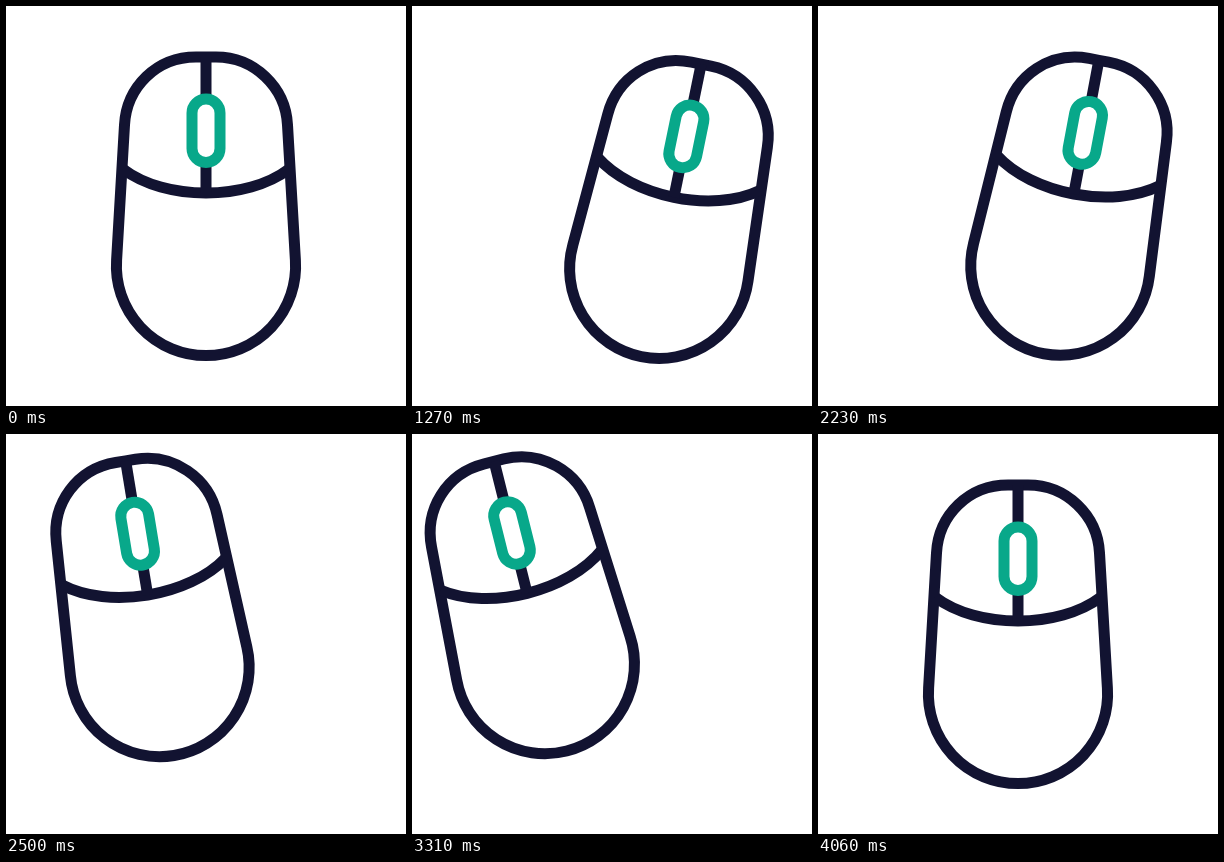
An HTML page with a canvas for the animation above (4.09 s loop, 400 px wide and 400 px high).

```html
<!DOCTYPE html>
<html lang="en">
<head>
<meta charset="utf-8">
<title>Computer mouse</title>
<style>
  html, body { margin: 0; width: 100%; height: 100%; overflow: hidden; background: #fff; }
  canvas { display: block; width: 100vw; height: 100vh; }
</style>
</head>
<body>
<canvas id="stage"></canvas>
<script>
const LOOP = 4090;
const NAVY = '#121331';
const GREEN = '#08a88a';
const canvas = document.getElementById('stage');
const ctx = canvas.getContext('2d');

const CENTER = { x: 0, y: 0, turn: 0 };
const RIGHT = { x: 67, y: 6.1, turn: 13.1 };
const LEFT = { x: -88.3, y: -28.5, turn: -15.2 };

// ease holds the x values of the two bezier handles; bend lifts the path
const moves = [
  { start: 1000, end: 1510, from: CENTER, to: RIGHT, ease: [0.28, 0.03], bend: 13 },
  { start: 2140, end: 2740, from: RIGHT, to: LEFT, ease: [0.3, 0.44], bend: 29 },
  { start: 3220, end: 3760, from: LEFT, to: CENTER, ease: [0.37, 0.5], bend: 25 }
];
const clicks = [[1570, 2050], [2740, 3070], [3760, 4060]];

const clamp = v => Math.min(1, Math.max(0, v));
const smooth = s => s * s * (3 - 2 * s);
const mix = (a, b, u) => a + (b - a) * u;

function bezierEase(p, [x1, x2]) {
  let lo = 0, hi = 1;
  for (let i = 0; i < 24; i++) {
    const s = (lo + hi) / 2, r = 1 - s;
    const x = 3 * s * r * r * x1 + 3 * s * s * r * x2 + s * s * s;
    if (x < p) lo = s; else hi = s;
  }
  return smooth((lo + hi) / 2);
}

function poseAt(t) {
  let pose = CENTER;
  for (const m of moves) {
    if (t < m.start) break;
    if (t >= m.end) { pose = m.to; continue; }
    const u = bezierEase((t - m.start) / (m.end - m.start), m.ease);
    pose = {
      x: mix(m.from.x, m.to.x, u),
      y: mix(m.from.y, m.to.y, u) - m.bend * u * (1 - u),
      turn: mix(m.from.turn, m.to.turn, u)
    };
  }
  return pose;
}

function pressAt(t) {
  for (const [a, b] of clicks) {
    if (t > a && t < b) {
      const p = (t - a) / (b - a);
      return smooth(clamp(Math.min(p, 1 - p) / 0.4));
    }
  }
  return 0;
}

function line(d, color = NAVY) {
  ctx.strokeStyle = color;
  ctx.stroke(new Path2D(d));
}

function drawMouse(press) {
  const d = 3 * press;
  ctx.lineWidth = 11;
  ctx.lineJoin = 'round';

  // the pressed left button dips inward, the rest of the shell is fixed
  line(`M200 51 H190 C${150.5 + d} ${51 + d} ${120.6 + d} ${81 + d} 118.5 119
    L110.6 254 A89.6 89.6 0 1 0 289.4 254 L281.5 119
    A71.6 71.6 0 0 0 210 51 Z`);
  line('M117 163 C138 179 169 187 200 187 S262 179 283 163');
  line('M200 51 V187');

  ctx.save();
  ctx.translate(200, 124.8);
  ctx.scale(1 - 0.05 * press, 1 - 0.05 * press);
  ctx.beginPath();
  ctx.roundRect(-14, -31.7, 28, 63.4, 14);
  ctx.fillStyle = '#fff';
  ctx.fill();
  ctx.strokeStyle = GREEN;
  ctx.stroke();
  ctx.restore();
}

function resize() {
  const ratio = window.devicePixelRatio || 1;
  canvas.width = Math.round(innerWidth * ratio);
  canvas.height = Math.round(innerHeight * ratio);
}

function render(t) {
  const { x, y, turn } = poseAt(t);
  ctx.setTransform(canvas.width / 400, 0, 0, canvas.height / 400, 0, 0);
  ctx.fillStyle = '#fff';
  ctx.fillRect(0, 0, 400, 400);
  ctx.translate(200 + x, 200 + y);
  ctx.rotate(turn * Math.PI / 180);
  ctx.translate(-200, -200);
  drawMouse(pressAt(t));
}

const begin = performance.now();
function tick() {
  render((performance.now() - begin) % LOOP);
  requestAnimationFrame(tick);
}
addEventListener('resize', resize);
resize();
tick();
</script>
</body>
</html>
```
